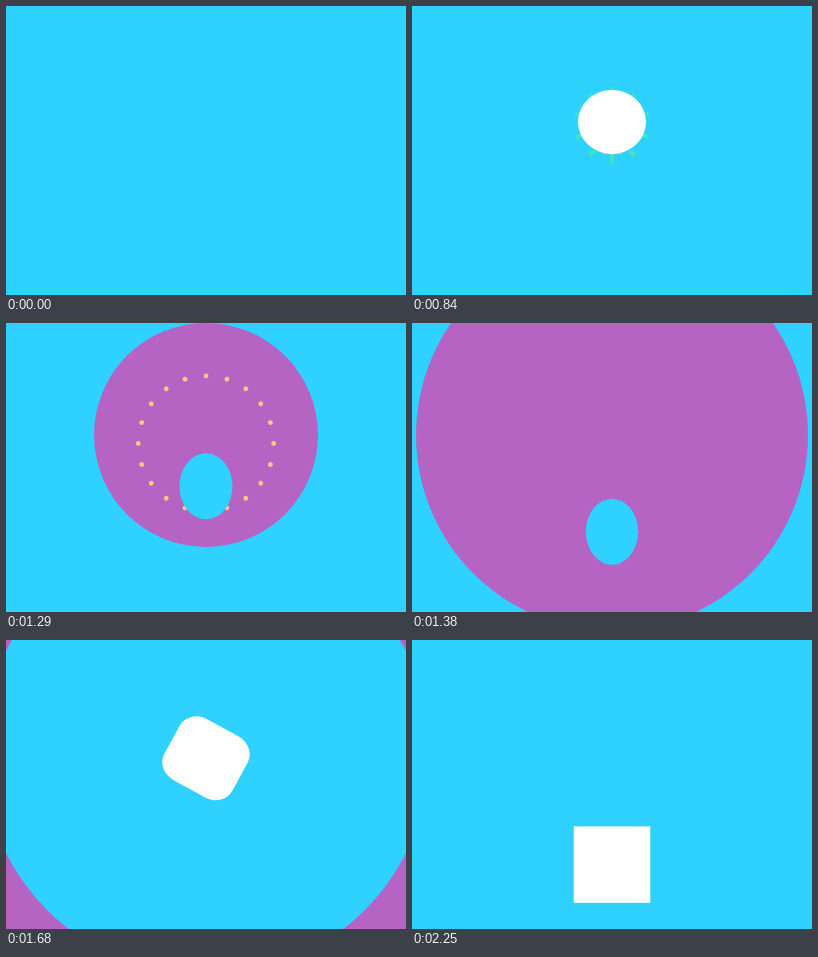
Animation, 400 px wide and 289 px high, one loop 3600 ms. Source, as an HTML page:

```html
<!DOCTYPE html>
<html lang="en">
<head>
<meta charset="utf-8">
<title>Bouncing ball</title>
<style>
  html, body { margin: 0; width: 100%; height: 100%; overflow: hidden; background: #2ed1ff; }
  svg { display: block; width: 400px; height: 289px; }
</style>
</head>
<body>
<svg viewBox="0 0 400 289">
  <rect width="400" height="289" fill="#2ed1ff"/>
  <circle id="purple" cx="200" cy="112" fill="#b564c4"/>
  <circle id="blue" cx="200" cy="112" fill="#2ed1ff"/>
  <g id="rays" transform="translate(200 119.5)" stroke="#3de5bd"></g>
  <g id="dots" transform="translate(200 120.5)" fill="#ffc980"></g>
  <rect id="ball"/>
</svg>
<script>
const LOOP = 3600, STEP = 30;
const DROPS = [300, 1170, 2040];
const FALL = 240, RISE = 540, APEX = 112, GROUND = 212;
const WIPE_SPEED = 28 / 30;

// phase within a bounce, half width, half height, corner share
const ROUND = [
  [0, 30, 32, .5], [120, 26.5, 33, .5], [240, 26, 33, .5],
  [330, 39, 25, .5], [360, 38.5, 25, .5], [540, 34, 32, .5], [870, 32, 32, .5]
];
const SQUARE = [
  [0, 30, 32, .5], [120, 26.5, 33, .5], [240, 26, 33, .5],
  [330, 39, 25, .5], [360, 38.5, 25, .5], [510, 38.7, 34.8, .27], [690, 38.25, 38.25, 0]
];

const $ = id => document.getElementById(id);
const clamp = v => Math.min(1, Math.max(0, v));
const mix = (a, b, k) => a + (b - a) * k;
const sineInOut = p => (1 - Math.cos(Math.PI * p)) / 2;
const quadInOut = p => p < .5 ? 2 * p * p : 1 - 2 * (1 - p) ** 2;
const quartOut = p => 1 - (1 - p) ** 4;

function set(el, attrs) {
  for (const name in attrs) el.setAttribute(name, attrs[name]);
}

function addParts(group, tag, count) {
  return Array.from({ length: count }, (_, i) => {
    const el = document.createElementNS("http://www.w3.org/2000/svg", tag);
    set(el, { transform: `rotate(${i * 360 / count - 90})` });
    return group.appendChild(el);
  });
}

const rays = addParts($("rays"), "line", 10);
const dots = addParts($("dots"), "circle", 20);

function shapeAt(table, phase) {
  const next = table.findIndex(row => row[0] > phase);
  if (next < 0) return table[table.length - 1].slice(1);
  const a = table[next - 1], b = table[next];
  const k = (phase - a[0]) / (b[0] - a[0]);
  return a.slice(1).map((v, i) => mix(v, b[i + 1], k));
}

function drawBall(t) {
  const ball = $("ball");
  ball.style.display = t < DROPS[0] ? "none" : "";
  if (t < DROPS[0]) return;

  const bounce = DROPS.filter(start => t >= start).length - 1;
  const phase = t - DROPS[bounce];
  const last = bounce === 2;
  let y;
  if (last) {
    y = mix(APEX, 224.6, sineInOut(clamp(phase / 210)));
  } else if (phase < FALL) {
    y = mix(bounce ? APEX : 12, GROUND, sineInOut(clamp((phase + 2) / FALL)));
  } else {
    y = mix(GROUND, APEX, quartOut(clamp((phase - FALL) / RISE)));
  }

  const [hw, hh, corner] = last ? [38.25, 38.25, 0] : shapeAt(bounce ? SQUARE : ROUND, phase);
  const turn = 90 * quadInOut(clamp((t - 1440) / 600));
  set(ball, {
    x: -hw, y: -hh, width: hw * 2, height: hh * 2,
    rx: hw * 2 * corner, ry: hh * 2 * corner,
    fill: t >= 1170 && t < 1440 ? "#2ed1ff" : "#fff",
    transform: `translate(200 ${y}) rotate(${turn})`
  });
}

function drawBurst(t) {
  const start = t < 1590 ? 780 : 1650;
  const since = t - start;
  const rayP = since / 360, dotP = since / 600;
  $("rays").style.display = rayP > 0 && rayP < 1 ? "" : "none";
  $("dots").style.display = dotP > 0 && dotP < 1 ? "" : "none";

  const rp = clamp(rayP), dp = clamp(dotP);
  const mid = 66 * quartOut(rp), half = 5 * (1 - rp);
  rays.forEach(el => set(el, { x1: mid - half, x2: mid + half, "stroke-width": 4 * (1 - rp * rp) }));
  const far = 67.7 * quartOut(dp), size = 5 * (1 - dp ** 4);
  dots.forEach(el => set(el, { cx: far, r: size }));
}

function draw(now) {
  const t = Math.floor((now % LOOP) / STEP) * STEP;
  const wipe = start => Math.min(280, Math.max(0, (t - start) * WIPE_SPEED));
  set($("purple"), { r: wipe(1170) });
  set($("blue"), { r: wipe(1440) });
  drawBurst(t);
  drawBall(t);
}

const begin = performance.now();
function tick() {
  draw(performance.now() - begin);
  requestAnimationFrame(tick);
}
tick();
</script>
</body>
</html>
```
